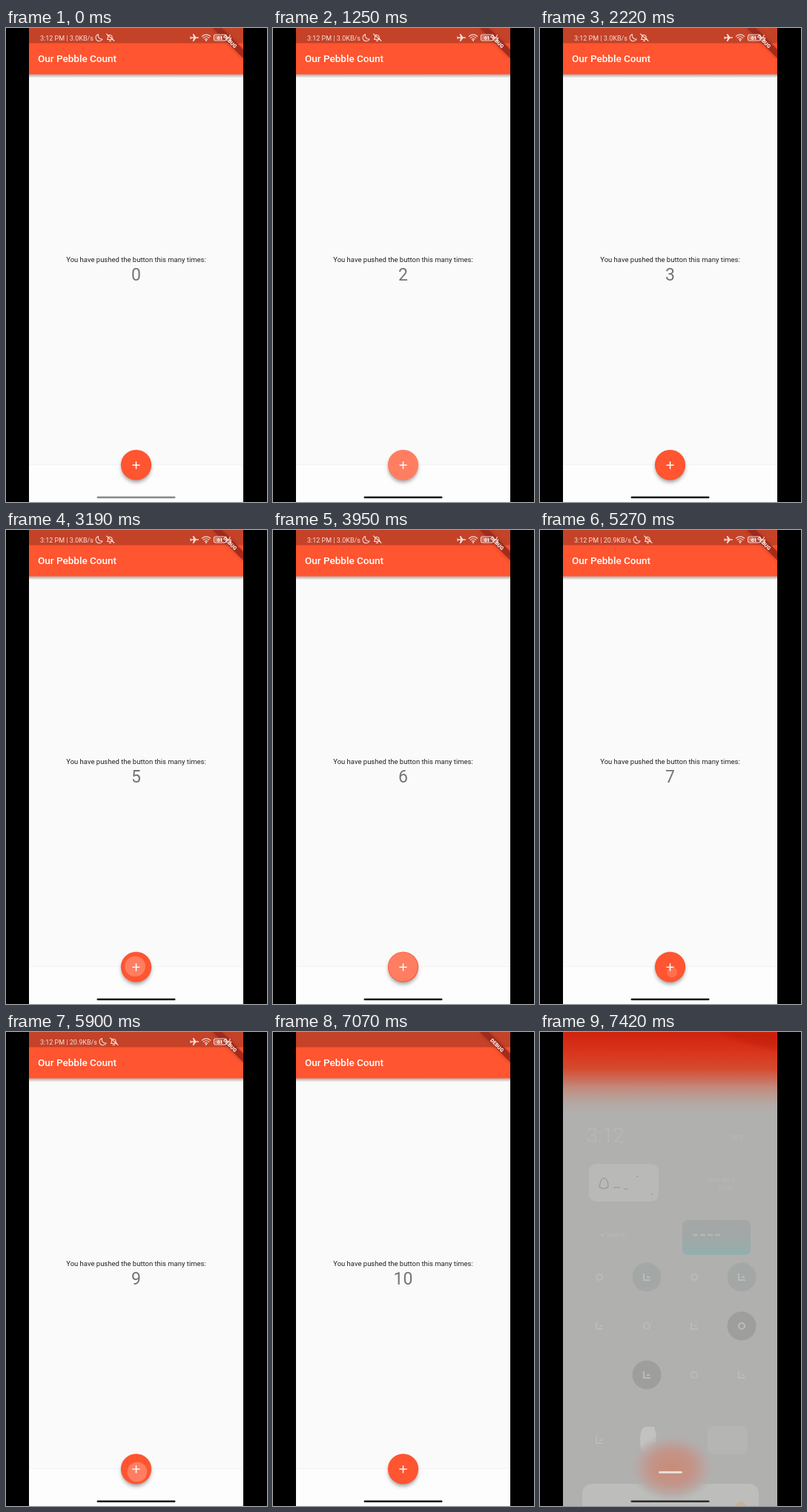
Write an HTML page that moves like this. It is 352 by 640 pixels and loops after 7.49 s.

```html
<!DOCTYPE html>
<html lang="en">
<head>
<meta charset="utf-8">
<title>Tap counter</title>
<style>
  html, body { margin: 0; width: 100%; height: 100%; overflow: hidden; background: #000; }
  svg { display: block; width: 100vw; height: 100vh; }
  text { font-family: Roboto, "Noto Sans", sans-serif; }
  .line { fill: none; stroke: #f7dcd6; stroke-width: 1.1; stroke-linecap: round; stroke-linejoin: round; }
</style>
</head>
<body>
<svg viewBox="0 0 352 640">
  <defs>
    <clipPath id="screen"><rect x="31" width="289" height="640"/></clipPath>
    <clipPath id="fabClip"><circle cx="175.5" cy="590" r="20.6"/></clipPath>
    <linearGradient id="barShade" x2="0" y2="1">
      <stop stop-color="#858585" stop-opacity=".7"/>
      <stop offset="1" stop-color="#858585" stop-opacity="0"/>
    </linearGradient>
    <linearGradient id="glow" x2="0" y2="1">
      <stop stop-color="#d0230f"/>
      <stop offset=".22" stop-color="#d8331a"/>
      <stop offset=".44" stop-color="#d54a2f"/>
      <stop offset=".56" stop-color="#cd6a57"/>
      <stop offset=".67" stop-color="#c28a7c"/>
      <stop offset=".8" stop-color="#b8a098"/>
      <stop offset=".9" stop-color="#b3acaa"/>
      <stop offset="1" stop-color="#b0b0af"/>
    </linearGradient>
    <radialGradient id="blob">
      <stop stop-color="#c98b76"/>
      <stop offset=".5" stop-color="#c3958a"/>
      <stop offset=".78" stop-color="#b8a7a2" stop-opacity=".9"/>
      <stop offset="1" stop-color="#b0b0af" stop-opacity="0"/>
    </radialGradient>
    <linearGradient id="teal" x2="0" y2="1">
      <stop stop-color="#a4a7a6"/>
      <stop offset=".55" stop-color="#a0a8a7"/>
      <stop offset="1" stop-color="#92afad"/>
    </linearGradient>
    <filter id="soft" x="-50%" y="-50%" width="200%" height="200%"><feGaussianBlur stdDeviation="2.4"/></filter>
  </defs>
  <rect width="352" height="640"/>
  <g clip-path="url(#screen)">
    <g id="app">
      <rect x="31" width="290" height="590" fill="#fafafa"/>
      <rect x="31" y="589.5" width="290" height="51" fill="#fdfdfd"/>
      <path d="M31 589.5H321" stroke="#f2f2f4" stroke-width=".8"/>
      <rect x="31" y="62.5" width="290" height="5" fill="url(#barShade)"/>
      <rect x="31" width="290" height="62.7" fill="#ff5530"/>
      <rect x="31" width="290" height="20.5" fill="#c44228"/>
      <text x="43" y="46.3" font-size="13.5" font-weight="500" fill="#fff">Our Pebble Count</text>
      <path d="M279 0H291L320.5 29.5V41.5Z" fill="#6b1608" opacity=".35" filter="url(#soft)"/>
      <path d="M279 0H291L320.5 29.5V41.5Z" fill="#9c2a1c" opacity=".88"/>
      <text transform="translate(301.2 18.8) rotate(45)" y="1.2" font-size="7" font-weight="900" text-anchor="middle" fill="#fff0ec">DEBUG</text>
      <g id="status">
        <text id="clock" x="46" y="16.6" font-size="9" fill="#f7dcd6"></text>
        <g id="modes" class="line">
          <path d="M124.5 8.5A4.7 4.7 0 1 0 130 15A5 5 0 0 1 124.5 8.5Z"/>
          <path d="M136.5 15.5H144.5L143 13.5V11.5A3 3 0 0 0 137.5 11V13.5ZM139.3 17.4H141.5M135.5 8L146 17.5"/>
        </g>
        <path d="M249 12.2H253L251.7 8H253.2L256.2 12.2H259.3Q260.8 13 259.3 13.8H256.2L253.2 18H251.7L253 13.8H250.5L249.3 15H248.5V11H249.3Z" fill="#f7dcd6"/>
        <g class="line">
          <path d="M264.3 11.2Q270 6.6 275.7 11.2M266.2 13.3Q270 10.2 273.8 13.3M268.2 15.3Q270 14 271.8 15.3"/>
          <circle cx="270" cy="17" r=".5"/>
          <rect x="280.5" y="9" width="16.5" height="8" rx="2.2"/>
          <path d="M298.8 11.8V14.2M302.3 9.5L300.5 13.2H303.7L302 17"/>
        </g>
        <rect x="282" y="10.5" width="10" height="5" rx="1" fill="#f7dcd6" opacity=".45"/>
        <text x="288.5" y="15.6" font-size="6.5" font-weight="700" text-anchor="middle" fill="#fff0ec">61</text>
      </g>
      <text x="175.5" y="316.3" font-size="9.47" text-anchor="middle" fill="#202020">You have pushed the button this many times:</text>
      <text id="count" x="175.5" y="340.5" font-size="23" text-anchor="middle" fill="#757575"></text>
      <circle cx="175.5" cy="593.5" r="20" fill="#5c5c5c" opacity=".55" filter="url(#soft)"/>
      <circle cx="175.5" cy="590" r="20.6" fill="#ff5530"/>
      <g clip-path="url(#fabClip)"><circle id="ripple" fill="#fff"/></g>
      <path d="M170.4 590.3H180.6M175.5 585.2V595.4" stroke="#fff" stroke-width="1.5"/>
    </g>
    <g id="home">
      <rect x="31" width="290" height="640" fill="#b0b0af"/>
      <rect x="31" width="290" height="112" fill="url(#glow)"/>
      <path d="M240 0H321V24Q280 18 240 0Z" fill="#a81000" opacity=".25" filter="url(#soft)"/>
      <g fill="#b9b9b8">
        <text x="63" y="149" font-size="27" font-weight="300">3:12</text>
        <text x="256" y="146" font-size="9">24°C</text>
        <rect x="66" y="178" width="94" height="51" rx="10"/>
        <text x="225" y="202" font-size="8">Mon, Apr 8</text>
        <text x="240" y="214" font-size="8">10:00</text>
        <text x="82" y="277" font-size="9">♦ Search</text>
      </g>
      <path d="M80 209Q82 198 86 197Q92 198 92 209Q86 214 80 209ZM99 210H108M113 212H119M130 195H133M150 219H153" fill="none" stroke="#969695" stroke-width="1.2"/>
      <rect x="192" y="254" width="92" height="47" rx="7" fill="url(#teal)"/>
      <path d="M206 274H246" stroke="#b3b6b5" stroke-width="3" stroke-dasharray="7 3"/>
      <g id="icons"></g>
      <path d="M154 533H143Q135 533 135 551T143 570H154Q160 551 154 533Z" fill="#c2c2c0"/>
      <rect x="226" y="532" width="54" height="38" rx="8" fill="#b5b5b4"/>
      <rect x="57" y="610" width="238" height="40" rx="13" fill="#bdbdbc"/>
      <circle cx="271" cy="642" r="8" fill="#c6b498"/>
      <ellipse cx="178" cy="588" rx="59" ry="46" fill="url(#blob)"/>
      <rect x="160" y="593" width="32" height="3" rx="1.5" fill="#e6dcd8"/>
    </g>
    <rect id="pill" x="122.5" y="632.4" width="106" height="2.7" rx="1.3"/>
  </g>
</svg>
<script>
  const LOOP = 7490, STEPS = 108;
  const HOLD = 80, GROW = 225, FADE = 150;
  const FAB = { x: 175.5, y: 590, r: 20.6 };
  // Moment of each finger release
  const taps = [440, 1040, 1790, 2460, 3130, 3800, 4760, 5300, 5840, 6420];

  const el = id => document.getElementById(id);
  const clamp = v => Math.min(1, Math.max(0, v));
  const mix = (a, b, k) => a + (b - a) * k;
  const easeOut = k => 1 - (1 - k) ** 2;
  const set = (node, attrs) => {
    for (const name in attrs) node.setAttribute(name, attrs[name]);
  };

  function buildIcons() {
    const shades = { "1,0": "#a3a8a7", "3,0": "#a3a8a7", "3,1": "#9e9e9d", "1,2": "#9e9e9d" };
    let out = "";
    for (let row = 0; row < 4; row++) {
      for (let col = 0; col < 4; col++) {
        if (row === 3 && col > 0 || row === 2 && col === 0) continue;
        const x = 80 + col * 64, y = row === 3 ? 551 : 331 + row * 66;
        const shade = shades[[col, row]];
        if (shade) out += `<circle cx="${x}" cy="${y}" r="19.5" fill="${shade}"/>`;
        out += (col + row) % 2
          ? `<path d="M${x - 4} ${y - 5}V${y + 4}H${x + 5}M${x} ${y}H${x + 4}" fill="none" stroke="#bbbbba" stroke-width="2"/>`
          : `<circle cx="${x}" cy="${y}" r="4" fill="none" stroke="#bbbbba" stroke-width="2"/>`;
      }
    }
    el("icons").innerHTML = out;
  }

  function drawRipple(t) {
    const i = taps.findIndex(up => t >= up - HOLD && t < up + GROW + FADE);
    if (i < 0) return set(el("ripple"), { opacity: 0 });
    const age = t - taps[i];
    const grow = easeOut(clamp(age / GROW));
    const low = i > 6;
    const shown = clamp((age + HOLD) / 75) * (1 - clamp((age - GROW) / FADE));
    set(el("ripple"), {
      cx: mix(FAB.x + (low ? 2.5 : -2.5), FAB.x, grow),
      cy: mix(FAB.y + (low ? 7 : -1.5), FAB.y, grow),
      r: mix(mix(6, 7.5, clamp(age / HOLD + 1)), FAB.r + 0.5, grow),
      opacity: 0.24 * shown
    });
  }

  function render(t) {
    const busy = t >= 4020;
    el("count").textContent = taps.filter(up => up <= t).length;
    el("clock").textContent = `3:12 PM | ${busy ? "20.9" : "3.0"}KB/s`;
    set(el("modes"), { transform: `translate(${busy ? 5 : 0} 0)` });
    set(el("status"), { opacity: t < 6930 ? 1 : 0 });
    drawRipple(t);

    const leave = clamp((t - 7130) / 280);
    el("app").style.filter = leave ? `blur(${leave * 8}px)` : "none";
    set(el("home"), { opacity: leave });
    set(el("pill"), { fill: t < 65 ? "#88888f" : leave > 0.5 ? "#2c2c2b" : "#151517" });
  }

  const start = performance.now();
  function tick() {
    const t = (performance.now() - start) % LOOP;
    const step = Math.floor((t + 6) * STEPS / LOOP) % STEPS;
    render(step * LOOP / STEPS);
    requestAnimationFrame(tick);
  }

  buildIcons();
  tick();
</script>
</body>
</html>
```
